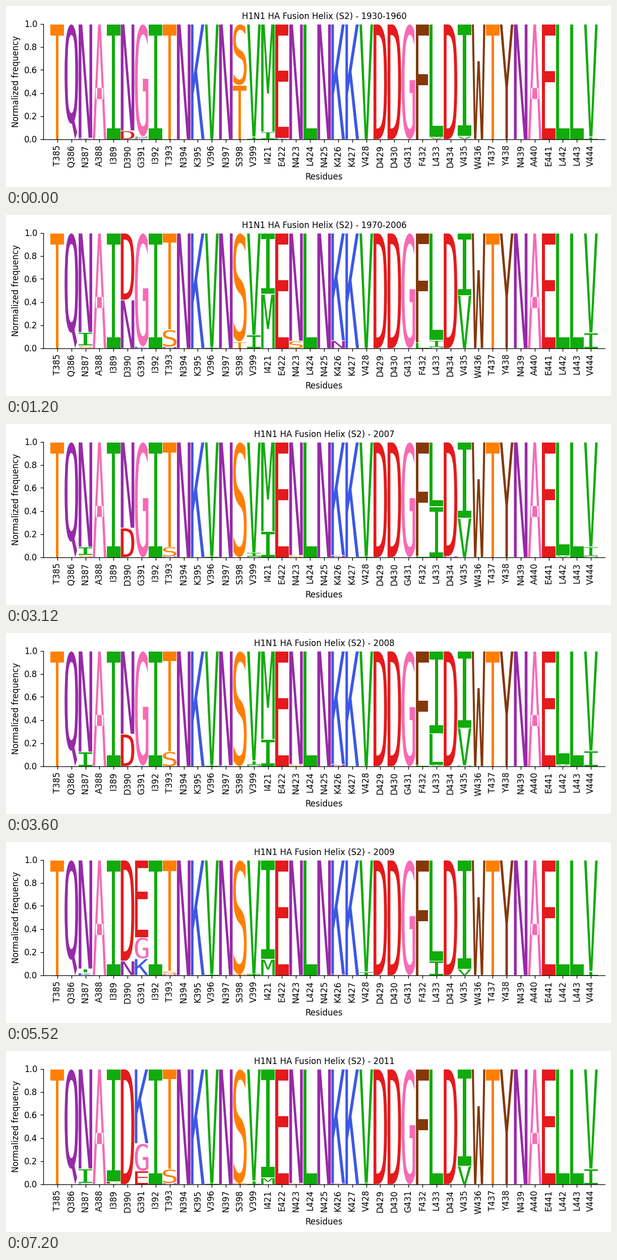
A matplotlib script for the animation above (8000 ms loop, 1200 by 361 pixels).

```python
import matplotlib.pyplot as plt
import numpy as np
from matplotlib.animation import FuncAnimation
from matplotlib.collections import PathCollection
from matplotlib.path import Path
from matplotlib.textpath import TextPath
from matplotlib.transforms import Affine2D

W, H, DPI = 1200, 361, 120
LEFT, RIGHT, TOP, BOTTOM = 74, 1188, 35.5, 265.5
STEP_MS, STEPS, HOLD = 400, 20, 3
GAP = 0.006    # blank strip above each letter, in frequency units
WIDTH = 0.965  # letter width, in columns
BAR = 0.096    # thickness of horizontal strokes, in letter heights

FIRST = "TQNAIDGITNKVNSV"            # residues 385-399
SECOND = "IENLNKKVDDGFLDVWTYNAELLV"  # residues 421-444
LABELS = ([f"{c}{385 + i}" for i, c in enumerate(FIRST)]
          + [f"{c}{421 + i}" for i, c in enumerate(SECOND)])

COLORS = {}
for group, color in [("GA", "#f76ab4"), ("ST", "#ff7f00"), ("VLIM", "#12ab0d"),
                     ("FWY", "#84380b"), ("NQ", "#972aa8"), ("K", "#3c58e5"),
                     ("DE", "#e41a1c")]:
    COLORS.update(dict.fromkeys(group, color))

# Share of each substitution; the labelled residue takes what is left.
PERIODS = [
    ("1930-1960", dict(
        N387=dict(K=.012), D390=dict(N=.925), G391=dict(W=.013, K=.012),
        S398=dict(T=.47), V399=dict(I=.022), I421=dict(M=.935),
        E422=dict(K=.012), L433=dict(V=.02), V435=dict(I=.973),
        V444=dict(I=.022))),
    ("1970-2006", dict(
        N387=dict(I=.117, S=.022), D390=dict(N=.42), G391=dict(K=.016),
        T393=dict(S=.148, N=.014), V396=dict(I=.01), S398=dict(T=.058),
        V399=dict(I=.115), I421=dict(M=.47), N423=dict(S=.064),
        K426=dict(N=.068), F432=dict(L=.05), L433=dict(I=.06, M=.01),
        V435=dict(I=.54), V444=dict(I=.135))),
    ("2007", dict(
        N387=dict(I=.07, S=.02), D390=dict(N=.745), T393=dict(S=.083, N=.008),
        V396=dict(I=.01), V399=dict(I=.033, M=.008), I421=dict(M=.775),
        N423=dict(S=.018), K426=dict(N=.018), V428=dict(I=.01),
        F432=dict(L=.01), L433=dict(I=.44), D434=dict(N=.01),
        V435=dict(I=.66), L442=dict(V=.016), V444=dict(I=.082, M=.01))),
    ("2008", dict(
        N387=dict(I=.125), D390=dict(N=.72), G391=dict(K=.007),
        T393=dict(S=.128), V396=dict(I=.01), N397=dict(K=.008),
        V399=dict(I=.037, M=.012), I421=dict(M=.765), N423=dict(S=.018),
        K426=dict(N=.018), F432=dict(L=.012), L433=dict(I=.715, V=.012),
        V435=dict(I=.667, M=.008), L442=dict(V=.016), V444=dict(I=.135))),
    ("2009", dict(
        N387=dict(I=.035, K=.022), D390=dict(N=.125), G391=dict(E=.67, K=.145),
        T393=dict(S=.028, N=.008), V396=dict(I=.01), S398=dict(T=.007),
        V399=dict(I=.014), I421=dict(M=.14), K426=dict(N=.01),
        V428=dict(I=.03), L433=dict(I=.125), V435=dict(I=.945),
        V444=dict(I=.036))),
    ("2010", dict(
        N387=dict(I=.06, K=.02), I389=dict(V=.012, F=.014), D390=dict(N=.01),
        G391=dict(K=.465, E=.385), T393=dict(S=.057, N=.01), V399=dict(I=.012),
        I421=dict(M=.025), V428=dict(I=.012), L433=dict(I=.012),
        V435=dict(I=.9), V444=dict(I=.065))),
    ("2011", dict(
        N387=dict(I=.125, K=.01), I389=dict(F=.018, V=.008),
        G391=dict(K=.645, E=.115), T393=dict(S=.122, N=.01),
        V396=dict(I=.01), S398=dict(T=.007), V399=dict(I=.032),
        I421=dict(M=.058), N423=dict(S=.01), K426=dict(N=.01),
        V428=dict(I=.012), V435=dict(I=.84), V444=dict(I=.135))),
]


def poly(points):
    return Path(points + points[:1], closed=True)


def rect(x0, x1, y0, y1):
    return poly([(x0, y0), (x1, y0), (x1, y1), (x0, y1)])


def bar(y, x0=0, x1=1):
    return rect(x0, x1, y, y + BAR)


def mirrored(half):
    """Symmetric polygon from the points of its left half."""
    return poly(half + [(1 - x, y) for x, y in reversed(half)])


def font_glyph(char):
    """Font outline scaled to fill the unit square."""
    path = TextPath((0, 0), char, size=100, prop=dict(family="DejaVu Sans Mono"))
    box = path.get_extents()
    path = path.transformed(Affine2D().translate(-box.x0, -box.y0)
                            .scale(1 / box.width, 1 / box.height))
    if char in "DGS":  # thin the top and bottom strokes to match BAR
        x, y = path.vertices.T
        y = np.interp(y, [0, .115, .885, 1], [0, BAR, 1 - BAR, 1])
        path = Path(np.column_stack([x, y]), path.codes)
    return path


STEM = rect(0, .22, 0, 1)
BLOCKS = dict(
    E=[STEM, bar(0), bar(.496, 0, .96), bar(1 - BAR, 0, .98)],
    F=[STEM, bar(.47, 0, .92), bar(1 - BAR)],
    L=[STEM, bar(0)],
    T=[rect(.41, .59, 0, 1), bar(1 - BAR)],
    I=[rect(.38, .62, 0, 1), bar(0), bar(1 - BAR)],
    A=[mirrored([(.5, .88), (.175, 0), (0, 0), (.4, 1)]), bar(.35, .22, .78)],
    W=[mirrored([(.5, .53), (.335, 0), (.165, 0), (0, 1), (.155, 1),
                 (.27, .2), (.42, .68)])],
)
GLYPHS = {c: Path.make_compound_path(*BLOCKS[c]) if c in BLOCKS else font_glyph(c)
          for c in COLORS}


def logo(changes):
    """Paths and colours of one full logo, smallest letter lowest."""
    paths, colors = [], []
    for col, label in enumerate(LABELS, 1):
        shares = dict(changes.get(label, {}))
        shares[label[0]] = 1 - sum(shares.values())
        base = 0
        for char, share in sorted(shares.items(), key=lambda kv: kv[1]):
            height = share - min(GAP, share * 0.35)
            place = Affine2D().scale(WIDTH, height).translate(col - WIDTH / 2, base)
            paths.append(GLYPHS[char].transformed(place))
            colors.append(COLORS[char])
            base += share
    return paths, colors


plt.rcParams.update({"font.family": "DejaVu Sans", "font.size": 10})
fig = plt.figure(figsize=(W / DPI, H / DPI), dpi=DPI, facecolor="white")
ax = fig.add_axes([LEFT / W, 1 - BOTTOM / H, (RIGHT - LEFT) / W, (BOTTOM - TOP) / H])
ax.set(xlim=(0, len(LABELS) + 1), ylim=(0, 1))
ax.spines[["top", "right"]].set_visible(False)
ax.set_xticks(range(1, len(LABELS) + 1), LABELS, rotation=90)


def px_text(x, y, text, **kw):
    return fig.text(x / W, 1 - y / H, text, ha="center", va="baseline", **kw)


title = px_text(631, 25.5, "")
px_text(631, 346, "Residues")
px_text(25, 150, "Normalized frequency", rotation=90, rotation_mode="anchor")

LOGOS = [logo(changes) for _, changes in PERIODS]
letters = ax.add_collection(PathCollection([], linewidths=0), autolim=False)


def draw(step):
    i = step // HOLD
    paths, colors = LOGOS[i]
    letters.set_paths(paths)
    letters.set_facecolor(colors)
    title.set_text(f"H1N1 HA Fusion Helix (S2) - {PERIODS[i][0]}")
    return letters, title


anim = FuncAnimation(fig, draw, frames=STEPS, interval=STEP_MS, repeat=True,
                     repeat_delay=0, init_func=lambda: draw(0))
plt.show()
```
